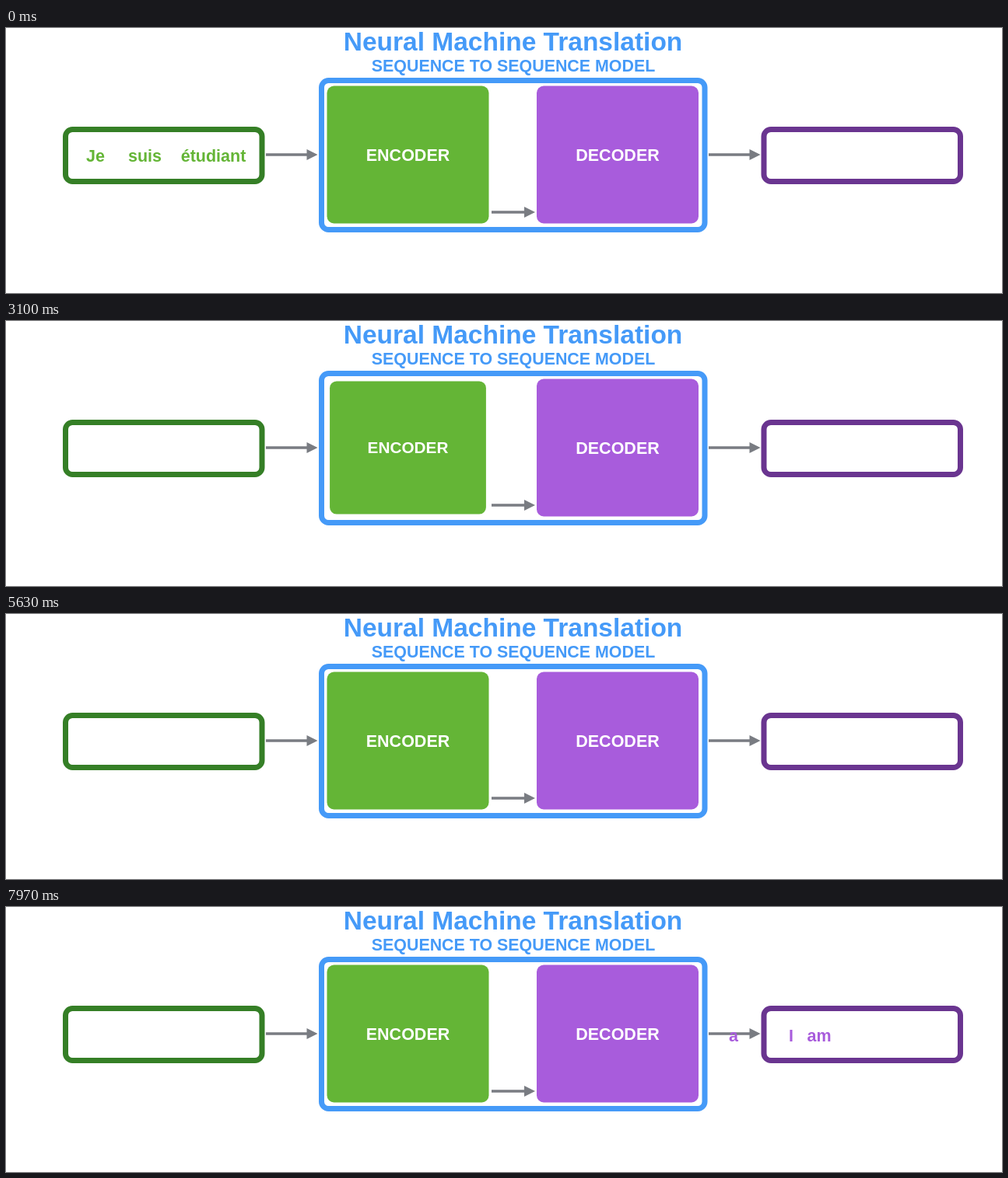
An HTML page with a canvas for the animation above (8000 ms loop, 1280 by 341 pixels).

```html
<!DOCTYPE html>
<html lang="en">
<head>
<meta charset="utf-8">
<title>Sequence to sequence model</title>
<style>
html, body { margin: 0; width: 100%; height: 100%; overflow: hidden; background: #fff; }
canvas { display: block; }
</style>
</head>
<body>
<canvas id="stage" width="1280" height="341"></canvas>
<script>
const ctx = document.getElementById('stage').getContext('2d');
const LOOP = 8000, BEAT = 790, MOVE = 460;
const BLUE = '#459af8', GREEN = '#64b536', PURPLE = '#a85cdc', GRAY = '#797c82';
const ENCODER_X = 516.5, DECODER_X = 786, GAP_X = 651.5, MID_Y = 163;
const ENCODER_POP = 1290, DECODER_POP = 5810;

// [text, resting x] in the order they are read or written
const inputWords = [['Je', 115], ['suis', 178.5], ['étudiant', 266.5]];
const outputWords = [['I', 1009], ['am', 1045], ['a', 1082]];

function glide(from, to, start, duration, t) {
  const u = Math.min(1, Math.max(0, (t - start) / duration));
  return from + (to - from) * u * u * (3 - 2 * u);
}

// Swell, dip below full size, settle
function popScale(t, first) {
  const tau = (t - first) % BEAT;
  if (t < first || t >= first + 3 * BEAT || tau > 350) return 1;
  return tau < 185
    ? 1 + 0.112 * Math.sin(Math.PI * tau / 185)
    : 1 - 0.045 * Math.sin(Math.PI * (tau - 185) / 165);
}

function text(str, x, y, color, size = 21.5) {
  ctx.font = `bold ${size}px "Liberation Sans", Arial, sans-serif`;
  ctx.textAlign = 'center';
  ctx.fillStyle = color;
  ctx.fillText(str, x, y);
}

function roundRect(x, y, w, h, r) {
  ctx.beginPath();
  ctx.roundRect(x, y, w, h, r);
}

function frame(x, y, w, h, color) {
  roundRect(x + 3.5, y + 3.5, w - 7, h - 7, 9);
  ctx.strokeStyle = color;
  ctx.lineWidth = 7;
  ctx.stroke();
}

function arrow(x1, x2, y) {
  ctx.fillStyle = GRAY;
  ctx.fillRect(x1, y - 1.75, x2 - x1 - 12, 3.5);
  ctx.beginPath();
  ctx.moveTo(x2, y);
  ctx.lineTo(x2 - 14, y - 7);
  ctx.lineTo(x2 - 14, y + 7);
  ctx.fill();
}

function block(label, x, color, scale) {
  ctx.save();
  ctx.translate(x, MID_Y);
  ctx.scale(scale, scale);
  roundRect(-104, -88.5, 208, 177, 9);
  ctx.fillStyle = color;
  ctx.fill();
  text(label, 0, 7.7, '#fff');
  ctx.restore();
}

function contextBlock(x) {
  ctx.save();
  ctx.translate(x, 143.5);
  roundRect(-23, -68, 46, 136, 9);
  ctx.fillStyle = '#f2862d';
  ctx.fill();
  ctx.rotate(Math.PI / 2);
  text('CONTEXT', 0, 7.7, '#fff');
  ctx.restore();
}

function draw(t) {
  ctx.fillStyle = '#fff';
  ctx.fillRect(0, 0, 1280, 341);

  text('Neural Machine Translation', 651.5, 28.5, BLUE, 33.5);
  text('SEQUENCE TO SEQUENCE MODEL', 652, 56, BLUE, 21.4);
  frame(73, 127, 259.5, 74, '#357f26');
  frame(402, 64, 499.5, 199, BLUE);
  frame(970.5, 127, 259.5, 74, '#6a3590');
  arrow(334, 400.5, MID_Y);
  arrow(903, 969.5, MID_Y);
  arrow(624, 680, 237);

  if (t > 3200) {
    const x = t < 4600
      ? glide(ENCODER_X, GAP_X, 3200, 1200, t)
      : glide(GAP_X, DECODER_X, 4700, 1100, t);
    contextBlock(x);
  }
  inputWords.forEach(([word, x], i) => {
    const start = ENCODER_POP - MOVE + i * BEAT;
    text(word, glide(x, ENCODER_X, start, MOVE, t), 171.5, GREEN);
  });
  outputWords.forEach(([word, x], i) => {
    const start = DECODER_POP + 350 + i * BEAT;
    if (t > start) text(word, glide(DECODER_X, x, start, MOVE, t), 172.5, PURPLE);
  });

  block('ENCODER', ENCODER_X, GREEN, popScale(t, ENCODER_POP));
  block('DECODER', DECODER_X, PURPLE, popScale(t, DECODER_POP));
}

function tick() {
  draw(performance.now() % LOOP);
  requestAnimationFrame(tick);
}
tick();
</script>
</body>
</html>
```
